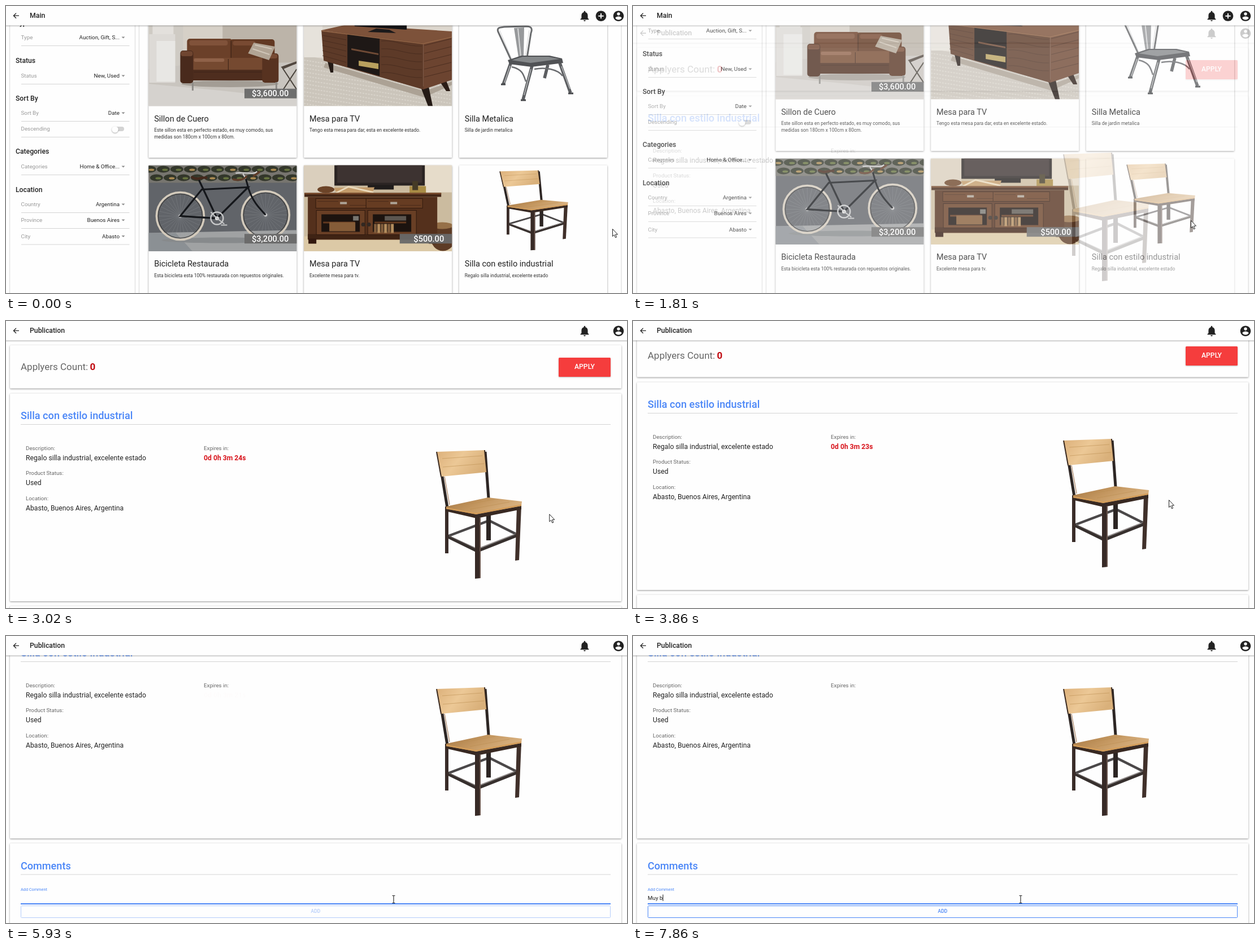
Recreate the animation shown at these times as an HTML page. Size 1099 by 509 pixels, loop 8 s.

```html
<!DOCTYPE html>
<html lang="es">
<head>
<meta charset="utf-8">
<title>Publication</title>
<style>
html, body { margin: 0; width: 100%; height: 100%; overflow: hidden; background: #fefefe; }
svg { display: block; }
#stage { width: 100%; height: 100%; font-family: Roboto, "Liberation Sans", sans-serif; }
text { white-space: pre; }
.panel { fill: #fefefe; filter: drop-shadow(.5px 1px 1.6px rgba(0,0,0,.42)); }
.side { fill: #fefefe; stroke: #e2e2e2; stroke-width: 1.4; }
.bar { fill: #fefefe; filter: drop-shadow(0 1px 1px rgba(0,0,0,.34)); }
</style>
</head>
<body>
<svg id="stage" viewBox="0 0 1099 509"></svg>
<script>
const INK = '#222', BLUE = '#4a86f7', RED = '#d8131b';
const LOOP = 8000;

// ---------- drawing helpers ----------
const text = (x, y, str, size, fill = INK, extra = '') =>
  `<text x="${x}" y="${y}" font-size="${size}" fill="${fill}" ${extra}>${str}</text>`;
const rect = (x, y, w, h, fill, extra = '') =>
  `<rect x="${x}" y="${y}" width="${w}" height="${h}" fill="${fill}" ${extra}/>`;
const poly = (pts, fill) => `<polygon points="${pts}" fill="${fill}"/>`;
const line = (d, stroke, w = 1, extra = '') =>
  `<path d="${d}" fill="none" stroke="${stroke}" stroke-width="${w}" ${extra}/>`;
const circle = (x, y, r, fill, extra = '') =>
  `<circle cx="${x}" cy="${y}" r="${r}" fill="${fill}" ${extra}/>`;
const ellipse = (x, y, rx, ry, fill) =>
  `<ellipse cx="${x}" cy="${y}" rx="${rx}" ry="${ry}" fill="${fill}"/>`;
const rule = (x1, x2, y, color = '#d4d4d4') => line(`M${x1} ${y}H${x2}`, color);
const repeat = (n, fn) => Array.from({ length: n }, (_, i) => fn(i)).join('');
const MED = 'font-weight="500"', BOLD = 'font-weight="700"';

// ---------- toolbar ----------
const DISC = 'M12 2C6.48 2 2 6.48 2 12s4.48 10 10 10 10-4.48 10-10S17.52 2 12 2z';
const ICONS = {
  bell: 'M12 22c1.1 0 2-.9 2-2h-4c0 1.1.89 2 2 2zm6-6v-5c0-3.07-1.64-5.64-4.5-6.32V4c0-.83-.67-1.5-1.5-1.5s-1.5.67-1.5 1.5v.68C7.63 5.36 6 7.92 6 11v5l-2 2v1h16v-1l-2-2z',
  plus: DISC + 'm5 11h-4v4h-2v-4H7v-2h4V7h2v4h4v2z',
  user: DISC + 'm0 3c1.66 0 3 1.34 3 3s-1.34 3-3 3-3-1.34-3-3 1.34-3 3-3zm0 14.2c-2.5 0-4.71-1.28-6-3.22.03-1.99 4-3.08 6-3.08 1.99 0 5.97 1.09 6 3.08-1.29 1.94-3.5 3.22-6 3.22z'
};
const icon = (name, x) =>
  `<path d="${ICONS[name]}" fill="${INK}" transform="translate(${x} 17.7) scale(.93) translate(-12 -12)"/>`;
const toolbar = (title, hasPlus, id) =>
  `<rect id="${id}" class="bar" x="-5" y="-5" width="1109" height="39.4"/>` +
  line('M23 17.2H13.5M18 12.6L13.4 17.2 18 21.8', INK, 1.3) +
  text(42, 21.3, title, 12.3, INK, MED) +
  icon('bell', 1024) + (hasPlus ? icon('plus', 1053) : '') + icon('user', 1084);

// ---------- pictures ----------
const sofa = () =>
  rect(252, 25, 262, 153, '#c6c0b7') + rect(252, 25, 62, 110, '#cfcbc4') + rect(313, 25, 70, 75, '#d6d0c7') +
  rect(383, 25, 131, 76, '#bcb4a9') +
  poly('252,112 320,104 514,100 514,178 252,178', '#c9c5bf') +
  poly('252,138 380,150 514,165 514,178 252,178', '#d5d2ce') +
  rect(259, 25, 37, 30, '#e3e0dc') + rect(253, 50, 46, 86, '#dddad6') + rect(266, 62, 33, 72, '#e8e7e4') +
  ellipse(396, 138, 86, 6, '#a39d95') +
  rect(320, 58, 80, 46, '#6b4029', 'rx="5"') + rect(396, 59, 79, 46, '#623923', 'rx="5"') +
  rect(324, 61, 68, 9, '#80523a', 'rx="4"') + rect(401, 62, 40, 8, '#784a32', 'rx="4"') +
  rect(326, 92, 130, 25, '#754930', 'rx="5"') + rect(332, 93, 54, 6, '#8f6148', 'rx="3"') +
  rect(322, 113, 138, 19, '#4e2d1e', 'rx="3"') +
  rect(308, 79, 23, 58, '#492a1c', 'rx="5"') + rect(309, 80, 21, 9, '#6f4530', 'rx="4"') +
  rect(453, 84, 29, 52, '#573220', 'rx="5"') + rect(455, 85, 25, 8, '#774b34', 'rx="4"') +
  line('M393 94V114M398 62V92M332 117H452', '#3b2217') +
  poly('438,65 476,72 465,96 428,84', '#b1a494') + line('M440 69L470 76M436 76L466 86', '#d0c6b8', 2) +
  line('M330 136V150M478 135V149', '#8e8b87', 3) +
  poly('486,108 514,98 514,102 490,112', '#51473f') + line('M489 110L514 148M514 112L487 153', '#4a443d', 2);

const mediaUnit = () =>
  rect(527, 25, 262, 153, '#ddd7ce') + poly('527,88 789,130 789,178 527,178', '#cbc5bb') +
  repeat(13, i => line(`M527 ${96 + i * 7}L789 ${138 + i * 7}`, '#d8d3ca', 2, 'stroke-dasharray="3 2"')) +
  rect(527, 25, 33, 66, '#e6e2db') +
  poly('565,101 740,151 789,134 789,140 740,162 562,109', '#aca295') +
  poly('568,95 579,97 579,118 574,118', '#241a15') + poly('733,142 748,144 755,178 747,178', '#241a15') +
  poly('766,132 778,130 786,151 779,151', '#2b1d16') +
  poly('558,43 603,33 789,45 789,58 738,68', '#7d523a') +
  poly('558,43 738,66 738,148 562,97', '#5d3a28') + poly('738,66 789,54 789,131 738,148', '#6c4430') +
  poly('604,50 661,57 661,124 604,108', '#1e1816') +
  poly('611,75 659,84 659,87 611,78', '#6f4a35') + poly('624,97 659,102 659,112 624,106', '#b8a05e') +
  line('M558 44L738 67L789 55', '#946647', 1.6) +
  repeat(5, i => line(`M664 ${62 + i * 14}C690 ${60 + i * 14} 706 ${72 + i * 14} 736 ${71 + i * 14}` +
    `M740 ${70 + i * 14}L788 ${58 + i * 14}M560 ${52 + i * 9}L602 ${60 + i * 10}`, '#482c1f', .9)) +
  poly('612,25 709,25 709,42 617,36', '#151416') + poly('655,40 678,42 690,48 640,46', '#1b191a');

const metalChair = () =>
  rect(802, 25, 262, 153, '#fefefe') +
  line('M894 96L871 46C868 38 874 38 882 37L920 36C930 36 932 40 929 48L922 92', '#6a6c6e', 3) +
  line('M895 94L874 44M919 90L926 43', '#c5c6c7', .8) +
  poly('899,39 917,38 916,89 907,91', '#97999b') + line('M906 40L911 90', '#d9dadb', 2) +
  line('M893 102L880 139M931 106L915 166M980 101L999 154M959 104L953 128', '#5c5e61', 5.5) +
  line('M892 106L882 136M929 112L917 158M983 107L998 147', '#b5b7b9', 1.6) +
  line('M895 108C914 112 916 122 920 134M935 112C954 108 976 112 985 124', '#6b6d70', 2.5) +
  poly('888,96 912,88 962,88 984,93 986,101 930,108 891,103', '#505255') +
  poly('895,96 914,90 960,90 980,94 928,101', '#85888a') +
  line('M876 139H884M911 167H920M995 155H1004', '#45474a', 3);

const wheel = (x, y) =>
  repeat(14, i => {
    const a = i * Math.PI / 14, c = 40 * Math.cos(a), s = 40 * Math.sin(a);
    return line(`M${x - c} ${y - s}L${x + c} ${y + s}`, '#97999b', .3);
  }) +
  circle(x, y, 42, 'none', 'stroke="#d3cabb" stroke-width="3.6"') +
  circle(x, y, 39, 'none', 'stroke="#3b3a39" stroke-width="1.2"') + circle(x, y, 3, '#c9c9c9');

const bicycle = () =>
  rect(252, 282, 262, 153, '#616469') + rect(252, 282, 262, 31, '#77756f') +
  repeat(24, i => {
    const x = 254 + (i >> 1) * 24 + (i % 2) * 12, y = 289 + (i % 2) * 15;
    return ellipse(x, y, 11.5, 6, '#33372b') + ellipse(x + 3, y + 1, 5, 2, i % 3 ? '#66733f' : '#a98a52');
  }) +
  poly('252,402 514,397 514,435 252,435', '#a0a2a3') + poly('252,402 300,402 330,435 252,435', '#8b9094') +
  ellipse(385, 415, 110, 5, '#878a8c') +
  wheel(308, 372) + wheel(459, 370) +
  line('M308 372L346 325L428 321L373 376Z M341 308L373 376', '#15171b', 3.2) +
  line('M308 372L373 376', '#15171b', 2.4) +
  line('M424 306L429 324C436 346 448 358 459 370', '#15171b', 3) +
  line('M424 306L419 297M406 296C424 293 438 300 444 293', '#d3d3d3', 2) +
  line('M402 307C410 309 420 308 425 302M438 301L448 294', '#5f3d2a', 3.4, 'stroke-linecap="round"') +
  line('M329 303C338 309 344 303 354 304', '#44291c', 4.4, 'stroke-linecap="round"') +
  circle(373, 376, 11, 'none', 'stroke="#c6c7c8" stroke-width="2.4"') + circle(373, 376, 3.6, '#dcdcdc') +
  line('M373 376L386 386M373 376L362 365M380 388H391', '#c4c5c6', 2);

const tvStand = () =>
  rect(527, 282, 262, 153, '#cbbb9f') + rect(527, 282, 54, 50, '#dacfbd') + poly('741,282 789,282 789,330 741,330', '#e6dcca') +
  poly('527,408 789,402 789,435 527,435', '#dcc9a6') +
  rect(581, 277, 160, 41, '#2b2423') + rect(586, 282, 150, 31, '#3d3331') + rect(640, 317, 46, 8, '#201c1b') +
  ellipse(566, 325, 15, 6, '#6c4428') + poly('580,322 652,321 648,332 586,332', '#c39b6a') +
  line('M584 331L606 320L650 330', '#ead9bb', 3) +
  rect(714, 319, 29, 12, '#a98c45') + rect(719, 310, 10, 16, '#453b26') +
  ellipse(773, 409, 22, 25, '#5d3b25') + ellipse(772, 389, 19, 6, '#967048') +
  rect(528, 331, 242, 7, '#432616') + rect(528, 331, 242, 2.5, '#764729') +
  rect(534, 338, 229, 76, '#54301c') + rect(534, 404, 229, 9, '#3f2314') +
  rect(535, 412, 14, 9, '#33190f') + rect(748, 412, 14, 9, '#33190f') +
  [548, 637].map(x => rect(x, 341, 100, 17, '#663c22', 'stroke="#321b0f"') +
    line(`M${x + 3} 346H${x + 40}M${x + 60} 353H${x + 97}`, '#4a2a18') + rect(x + 43, 347, 12, 4, '#aea497')).join('') +
  [549, 640].map((x, i) => rect(x, 362, 86, 43, '#693f25', 'stroke="#2f190e"') +
    rect(x + 9, 369, 68, 31, '#1c130f') + rect(x + 12, 382, 56, 3, '#63391f') + (i
      ? repeat(6, k => rect(x + 11 + k * 6, 386, 5, 16, k % 2 ? '#b48d5d' : '#805c3b'))
      : rect(x + 23, 383, 46, 16, '#855c38'))).join('') +
  rect(614, 372, 10, 8, '#77756f') + rect(670, 372, 38, 8, '#5c5650') +
  circle(632, 387, 3.5, '#322822') + circle(642, 387, 3.5, '#322822');

// Wooden seat on a dark metal frame, shared by the grid and the detail page.
const woodChair =
  line('M765 214L781 311M848 212L854 294', '#2d2624', 5) + line('M776 256L785 306', '#b6967c', 1.5) +
  poly('762,212 847,209 851,248 770,256', 'url(#wood)') + line('M762 212L770 256M847 209L851 248', '#3a2a20', 2) +
  line('M781 362L855 334L905 359', '#4b4849', 4.5) + rect(850, 318, 8, 51, '#2c2523') +
  line('M781 362L834 388L905 360', '#37302e', 5.5) + line('M784 361L834 384L903 357', '#77706f', 1.2) +
  rect(777, 311, 6, 81, '#3a2d29') + poly('904,310 912,308 908,404 901,405', '#40302a') +
  poly('777,309 833,322 912,307 912,314 833,330 777,317', '#382922') +
  poly('830,322 840,322 840,436 830,437', '#372a26') + rect(838, 328, 2, 108, '#67524a') +
  poly('779,309 853,293 913,300 912,308 832,323 779,313', 'url(#wood2)') +
  line('M779 312L832 321.5L912 306.5', '#d49d59', 2.5) +
  line('M800 308L866 296M821 314L891 301M772 224L843 219M773 239L846 233', '#b98c50', .8, 'opacity=".7"');

const industrial = () => rect(802, 282, 262, 153, '#fefefe') +
  `<use href="#chair" transform="translate(874 291) scale(.8 .622) translate(-762 -209)"/>`;

// ---------- listing page ----------
const CARDS = [
  ['Sillon de Cuero', ['Este sillon esta en perfecto estado, es muy comodo, sus', 'medidas son 180cm x 100cm x 80cm.'], '$3,600.00', sofa],
  ['Mesa para TV', ['Tengo esta mesa para dar, esta en excelente estado.'], '', mediaUnit],
  ['Silla Metalica', ['Silla de jardin metalica'], '', metalChair],
  ['Bicicleta Restaurada', ['Esta bicicleta esta 100% restaurada con repuestos originales.'], '$3,200.00', bicycle],
  ['Mesa para TV', ['Excelente mesa para tv.'], '$500.00', tvStand],
  ['Silla con estilo industrial', ['Regalo silla industrial, excelente estado'], '', industrial]
];
const card = ([title, lines, price, art], i) => {
  const x = 252.4 + (i % 3) * 274.8, y = 25 + Math.floor(i / 3) * 257.5, right = x + 262;
  return `<g id="card${i}"><rect class="panel" x="${x}" y="${y}" width="262" height="244" rx="1"/>` +
    `<svg x="${x}" y="${y}" width="262" height="152.3" viewBox="${Math.floor(x)} ${Math.floor(y)} 262 152.3">${art()}</svg>` +
    (price ? rect(right - 92.4, y + 121.7, 92.4, 17, '#6a6a6a', 'opacity=".95"') +
      text(right - 14, y + 135, price, 14.6, '#fff', MED + ' text-anchor="end"') : '') +
    text(x + 9.8, y + 179.5, title, 14.5, INK) +
    lines.map((s, k) => text(x + 9.8, y + 198 + k * 12, s, 8.45, '#333')).join('') + '</g>';
};
const heading = (y, s) => text(17, y + 4.3, s, 12.2, INK, MED);
const field = (y, name, value) => text(26.5, y + 3.4, name, 9.8, '#999') +
  text(201, y + 3.4, value, 9.8, INK, 'text-anchor="end"') +
  poly(`204.5,${y - 1.6} 210.5,${y - 1.6} 207.5,${y + 1.6}`, '#8a8a8a') + rule(27, 218.5, y + 14.5);
const sidebar = () =>
  heading(30, 'Type') + field(56, 'Type', 'Auction, Gift, S...') +
  heading(97, 'Status') + field(124, 'Status', 'New, Used') +
  heading(163.5, 'Sort By') + field(190, 'Sort By', 'Date') +
  text(26.5, 221.4, 'Descending', 9.8, '#999') + rule(27, 218.5, 232.5) +
  rect(190, 214, 19, 8, '#d3d3d3', 'rx="4"') +
  circle(193, 219, 5.8, '#fefefe', 'style="filter:drop-shadow(0 1px 1px rgba(0,0,0,.35))"') +
  heading(258, 'Categories') + field(285, 'Categories', 'Home &amp; Office...') +
  heading(325.5, 'Location') + field(352, 'Country', 'Argentina') +
  field(380, 'Province', 'Buenos Aires') + field(408.5, 'City', 'Abasto');
const listing = () =>
  '<g id="list"><rect class="side" x="6.5" y="-40" width="222" height="700"/>' +
  '<rect class="side" x="235.5" y="-40" width="853.5" height="700"/>' +
  sidebar() + CARDS.map(card).join('') + '</g>' + toolbar('Main', true, 'bar1');

// ---------- detail page ----------
const panel = (y, h) => `<rect class="panel" x="7" y="${y}" width="1082" height="${h}" rx="1.5"/>`;
const detail = (x, y, name, value) => text(x, y, name, 9.75, '#666') + text(x, y + 18, value, 12.2, INK);
const publication = () =>
  '<rect id="back" x="0" y="34.4" width="1099" height="520" fill="#fefefe"/><g id="body">' +
  panel(43, 76.5) + panel(128.5, 368.5) + panel(505.5, 260) +
  text(26, 87, 'Applyers Count:', 17, '#666') + text(148.5, 87, '0', 17, '#c00a10', BOLD + ' class="blink"') +
  rect(978, 65, 92, 34, '#f53d3d', 'rx="1.5" style="filter:drop-shadow(0 1px 1px rgba(0,0,0,.25))"') +
  text(1024, 85.4, 'APPLY', 12.2, '#fff', MED + ' text-anchor="middle"') +
  text(26, 174, 'Silla con estilo industrial', 18.1, BLUE, MED) + rule(26, 1070, 183.5) +
  detail(35, 228.5, 'Description:', 'Regalo silla industrial, excelente estado') +
  detail(35, 272.7, 'Product Status:', 'Used') +
  detail(35, 317.5, 'Location:', 'Abasto, Buenos Aires, Argentina') +
  detail(350, 228.5, 'Expires in:', '') +
  text(350, 246.5, '', 12.2, RED, BOLD + ' class="blink" id="expires"') +
  '<use href="#chair" y="20"/>' +
  text(26, 551.8, 'Comments', 18.1, BLUE, MED) + rule(26, 1070, 561) +
  text(26, 590, 'Add Comment', 7.3, '#999', 'id="label"') +
  text(26, 606, '', 9.8, INK, 'id="typed"') + rect(0, 596.5, 1, 11.5, '#111', 'id="caret"') +
  line('M26 613H1070', '#d4d4d4', 1, 'id="under"') +
  '<g id="add">' + rect(26.5, 616.5, 1043, 21, '#fefefe', `stroke="${BLUE}" rx="1"`) +
  text(548, 629.2, 'ADD', 8.6, BLUE, MED + ' text-anchor="middle"') + '</g></g>' +
  toolbar('Publication', false, 'bar2');

const gradient = (id, a, b, c) => `<linearGradient id="${id}" x2="1" y2=".4"><stop stop-color="${a}"/>` +
  `<stop offset=".5" stop-color="${b}"/><stop offset="1" stop-color="${c}"/></linearGradient>`;
const POINTERS = {
  arrow: '<path d="M.5 .5V13.6L3.4 10.9 5.5 15.8 7.6 14.9 5.5 10.1H9.5Z" fill="#fff" stroke="#222"/>',
  hand: '<path transform="translate(-4 -1)" d="M4 1.9c0-2 2.8-2 2.8 0V8c.6-1 2.2-.8 2.4.3.8-.8 2.2-.3 2.3.8 1-.5 2 .2 2 1.2V14c0 2-1.3 3-1.3 5.2H5.6C5.2 16.8 2.2 14.4 .7 11.8c-.7-1.6 1-2.3 2-1.2L4 11.8ZM7 12.5V16M9.2 12.5V16M11.2 12.5V16" fill="#fff" stroke="#222"/>',
  beam: '<path d="M-2.5 -6.5H-.6L0 -6 .6 -6.5H2.5M0 -6V6M-2.5 6.5H-.6L0 6 .6 6.5H2.5" fill="none" stroke="#222" stroke-width="1.1"/>'
};
const stage = document.getElementById('stage');
stage.innerHTML =
  `<defs>${gradient('wood', '#dcb07a', '#ecc896', '#d9b07a')}${gradient('wood2', '#a67845', '#c3965f', '#dab382')}` +
  `<g id="chair">${woodChair}</g></defs>` + rect(0, 0, 1099, 509, '#fefefe') +
  `<g id="page1">${listing()}</g><g id="page2">${publication()}</g><g id="pointer">` +
  Object.entries(POINTERS).map(([k, v]) => `<g id="${k}">${v}</g>`).join('') + '</g>';

// ---------- motion ----------
const $ = id => document.getElementById(id);
const set = (id, name, value) => $(id).setAttribute(name, value);
const show = (id, on) => set(id, 'visibility', on ? 'visible' : 'hidden');
const clamp = v => Math.max(0, Math.min(1, v));
const track = (keys, t, n = 1) => {
  const i = keys.findIndex(k => k[0] > t);
  if (i === 0) return keys[0][n];
  if (i < 0) return keys[keys.length - 1][n];
  const a = keys[i - 1], b = keys[i];
  return a[n] + (b[n] - a[n]) * (t - a[0]) / (b[0] - a[0]);
};

// The screen only refreshes at these moments.
const run = (a, b, n) => Array.from({ length: n }, (_, i) => a + (b - a) * i / (n - 1));
const TICKS = [0, 150, ...run(580, 840, 3), 1810, 1960, 2080, 2350, 2470, ...run(2750, 3710, 8),
  ...run(3860, 4830, 8), ...run(4970, 5930, 8), ...run(6080, 7040, 8), ...run(7160, 7860, 6)];

const POINTER = [[450, 1073, 395], [840, 987, 380], [2210, 987, 380], [2470, 968, 355], [3710, 948, 317],
  [3990, 948, 317], [4550, 703, 432], [4970, 686, 467]];
const SCROLL = [[3710, 0], [3860, 20], [4000, 85], [4140, 125], [4280, 138]];
const HOVER = [[500, 1], [840, .6]];
const OPEN = 1781, FOCUS = 5240;
const KEYS = [6900, 7160, 7440, 7580, 7860];

// Page entrance easing: cubic-bezier(.36, .66, .04, 1)
function enter(x) {
  if (x <= 0 || x >= 1) return clamp(x);
  let lo = 0, hi = 1;
  for (let i = 0; i < 24; i++) {
    const s = (lo + hi) / 2, r = 1 - s;
    if (3 * r * r * s * .36 + 3 * r * s * s * .04 + s ** 3 < x) lo = s; else hi = s;
  }
  const r = 1 - lo;
  return 3 * r * r * lo * .66 + 3 * r * lo * lo + lo ** 3;
}

function blink(t) {
  const period = 964, p = (t - 3860 + 10 * period) % period;
  return p < 400 ? clamp((143 - p) / 113) : clamp((p - 400) / 130);
}

function draw(now) {
  const t = TICKS.filter(k => k <= now + .01).pop();

  set('list', 'transform', `translate(0 ${t < 150 ? 0 : -12})`);
  set('card5', 'opacity', track(HOVER, t));

  const p = enter((t - OPEN) / 280), done = p >= 1;
  show('page1', !done);
  set('page2', 'display', p > 0 ? 'inline' : 'none');
  set('page2', 'opacity', p);
  set('page2', 'transform', `translate(0 ${40 * (1 - p)})`);
  set('back', 'opacity', done ? 1 : .9);
  set('bar2', 'opacity', done ? 1 : .9);
  set('body', 'transform', `translate(0 ${-track(SCROLL, t)})`);

  const secs = 24 - Math.floor((t - OPEN - 1000) / 1000);
  $('expires').textContent = t < OPEN + 1000 ? '' : `0d 0h 3m ${secs}s`;
  document.querySelectorAll('.blink').forEach(el => el.setAttribute('opacity', blink(t)));

  const focused = t >= FOCUS, count = KEYS.filter(k => k <= t + .01).length;
  const typed = $('typed'), since = t - (count ? KEYS[count - 1] : FOCUS);
  typed.textContent = 'Muy b'.slice(0, count);
  set('caret', 'x', 26 + (count ? typed.getComputedTextLength() : 0));
  set('caret', 'opacity', focused && since % 1060 < 530 ? 1 : 0);
  set('label', 'fill', focused ? BLUE : '#999');
  set('under', 'stroke', focused ? BLUE : '#d4d4d4');
  set('under', 'stroke-width', focused ? 2 : 1);
  set('add', 'opacity', count ? 1 : .4);

  const x = track(POINTER, t), y = track(POINTER, t, 2);
  const kind = y > 455 ? 'beam' : t < OPEN && x < 1064 ? 'hand' : 'arrow';
  for (const k in POINTERS) show(k, k === kind);
  set('pointer', 'transform', `translate(${x} ${y})`);
}

function frame() {
  draw(performance.now() % LOOP);
  requestAnimationFrame(frame);
}
frame();
</script>
</body>
</html>
```
